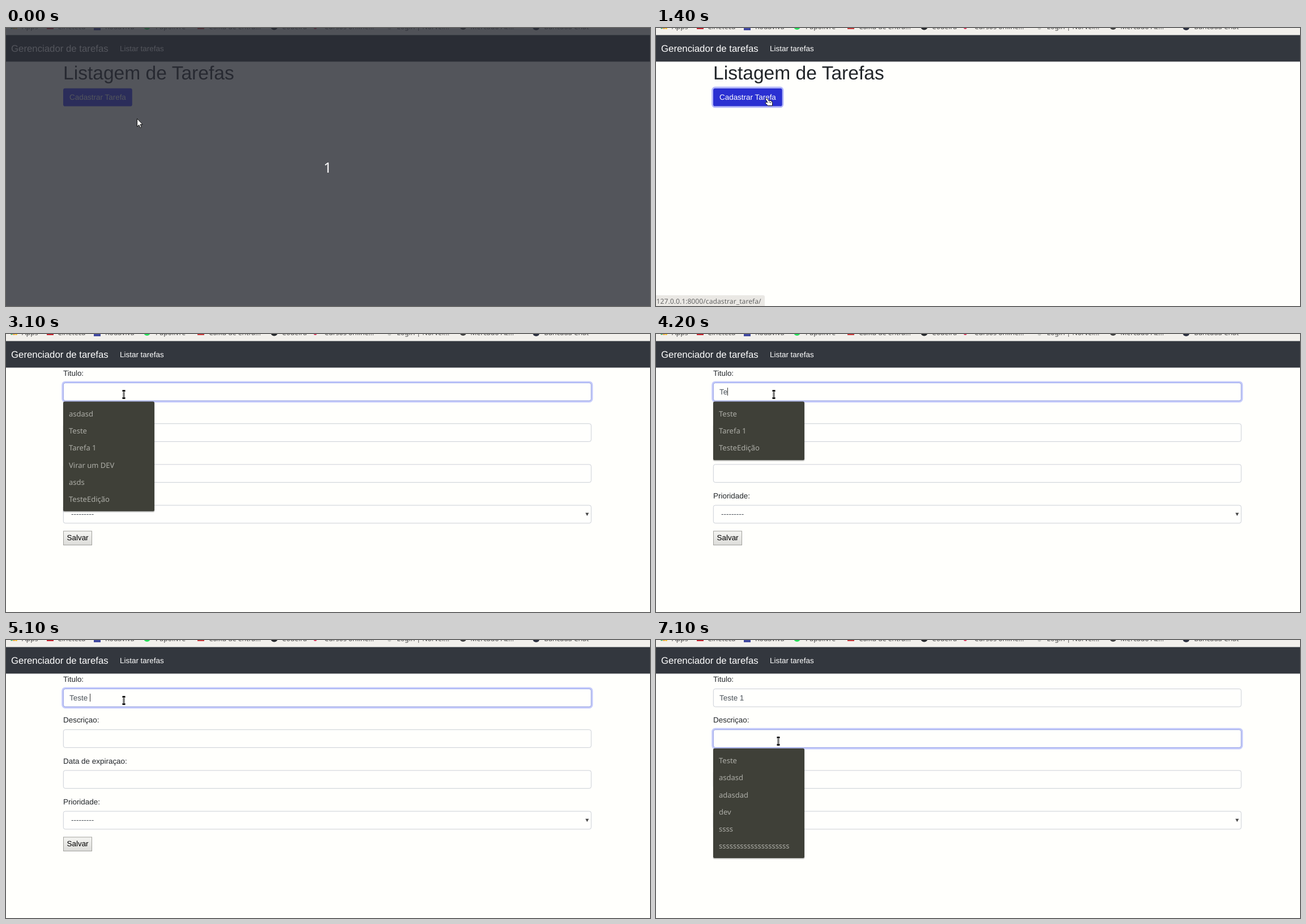
An HTML page that plays this animation: 1137x492 px, repeating every 8000 ms.

```html
<!DOCTYPE html>
<html lang="pt-BR">
<head>
<meta charset="utf-8">
<title>Gerenciador de tarefas</title>
<style>
  html, body { margin: 0; width: 100%; height: 100%; overflow: hidden; background: #fffffc; }
  svg { display: block; width: 1137px; height: 492px; }
  text { font-family: "Liberation Sans", Arial, sans-serif; text-rendering: geometricPrecision; white-space: pre; }
  .ui { font-family: "Noto Sans", "Open Sans", sans-serif; }
</style>
</head>
<body>
<svg id="stage" viewBox="0 0 1137 492"></svg>
<script>
const LOOP = 8000, STEP = 100;
const LEFT = 101, WIDTH = 932.5, FIELD_H = 31.9, PITCH = 72.2;
const INK = '#212529';

const rect = (x, y, w, h, fill, more = '') =>
  `<rect x="${x}" y="${y}" width="${w}" height="${h}" fill="${fill}" ${more}/>`;
const dot = (x, y, r, fill) => `<circle cx="${x}" cy="${y}" r="${r}" fill="${fill}"/>`;
const text = (x, y, s, size = 13.45, fill = INK, more = '') =>
  `<text x="${x}" y="${y}" font-size="${size}" fill="${fill}" ${more}>${s}</text>`;
const ui = (x, y, s, size, fill, more = '') => text(x, y, s, size, fill, 'class="ui" ' + more);
const clamp = v => Math.max(0, Math.min(1, v));
const fieldY = i => 86.4 + i * PITCH;
// Last entry whose start time has been reached
const latest = (list, t) => list.filter(e => e[0] <= t).pop();

const bookmarks = [
  [28, 'Apps'], [91, 'Cineteca'], [175, 'Rodaviva'], [264, 'Papolivre'],
  [358, 'Caixa de entra...'], [487, 'Codeira'], [562, 'Cursos online...'],
  [690, 'Login | Norvel...'], [820, 'Mercado Az...'], [950, 'Bancada Chat']
];

const typing = [
  [0, '', 112], [3500, 'T', 120], [4200, 'Te', 126], [4400, 'Tes', 133],
  [4500, 'Test', 137], [4600, 'Teste', 144], [4800, 'Teste ', 148], [5800, 'Teste 1', 156]
];

const menus = [
  [0, 0, []],
  [2500, 0, ['asdasd', 'Teste', 'Tarefa 1', 'Virar um DEV', 'asds', 'TesteEdição']],
  [3600, 0, ['Teste', 'Tarefa 1', 'TesteEdição']],
  [4500, 0, ['Teste', 'TesteEdição']],
  [4900, 0, []],
  [6700, 1, ['Teste', 'asdasd', 'adasdad', 'dev', 'ssss', 's'.repeat(20)]]
];

// Pointer path: time, x, y
const path = [
  [0, 231, 160], [600, 231, 160], [800, 222, 150], [1100, 199, 131], [1900, 199, 131],
  [2100, 208, 107], [5500, 208, 107], [5600, 214, 107], [5800, 233, 107], [5900, 233, 107],
  [6000, 238, 112], [6100, 233, 132], [6200, 222, 162], [6300, 216, 179], [LOOP, 216, 179]
];

function pointerAt(t) {
  const i = path.findIndex(p => p[0] > t);
  const [a, b] = [path[i - 1], path[i]];
  const k = (t - a[0]) / (b[0] - a[0]);
  return [a[1] + (b[1] - a[1]) * k, a[2] + (b[2] - a[2]) * k];
}

function header() {
  return rect(0, 0, 1137, 12.5, '#f2f0ec') +
    dot(10, -.5, 2, '#35a853') + dot(14, 0, 2, '#f29b30') + dot(18, 0, 2, '#f4c020') +
    rect(72, -8, 12, 10, '#c3202b') + rect(155, -8, 12, 12, '#4048a0') +
    dot(249, -3, 6, '#25e05a') + rect(338, -8, 12, 10, '#c93a3a') +
    dot(473.5, -3, 6.5, '#25282c') + dot(546, -1, 3, '#d8365c') +
    dot(677, 0, 3, '#c8c8c4') + dot(807, -3, 6, '#404040') + dot(936, -2, 6, '#2c3040') +
    bookmarks.map(([x, s]) => ui(x, 1.5, s, 12.2, '#505050')).join('') +
    rect(0, 12.5, 1137, 47, '#33373e') +
    text(9, 41.8, 'Gerenciador de tarefas', 16.8, '#fff') +
    text(201, 40.5, 'Listar tarefas', 13.45, '#fff');
}

function listPage(t) {
  const ring = t >= 1400
    ? rect(99.5, 105.2, 124.6, 34.8, 'none', 'rx="5" stroke="#b4b8fb" stroke-width="2.7"') : '';
  return text(LEFT, 91.3, 'Listagem de Tarefas', 33.6) + ring +
    rect(LEFT, 106.7, 121.8, FIELD_H, t >= 1000 ? '#2a30d2' : '#3539f5', 'rx="3.4"') +
    text(112, 127, 'Cadastrar Tarefa', 13.45, '#fff');
}

function field(i, label, focus) {
  const y = fieldY(i);
  const frame = (grow, color, w, alpha) => rect(LEFT + .3 - grow, y + .1 - grow,
    WIDTH - .6 + 2 * grow, FIELD_H - .2 + 2 * grow, 'none',
    `rx="${3.4 + grow}" stroke="${color}" stroke-width="${w}" opacity="${alpha}"`);
  return text(LEFT, y - 12.2, label) + rect(LEFT, y, WIDTH, FIELD_H, '#fffffd', 'rx="3.4"') +
    frame(1.7, '#c5cbfb', 2.7, focus) + frame(0, '#cbcfd6', 1, 1) + frame(0, '#95a2ee', 1, focus);
}

function menu([, row, items]) {
  if (!items.length) return '';
  const y = fieldY(row) + 33.2, h = 13 + 30.2 * items.length;
  return rect(100.5, y + 1, 162, h + 1, '#000', 'rx="3" opacity=".18"') +
    rect(LEFT, y, 161, h, '#3f4038', 'rx="2.5"') +
    items.map((s, i) => ui(111, y + 26.4 + i * 30.2, s, 13, '#adada7', 'font-weight="500"')).join('');
}

function formPage(t) {
  const leave = clamp((t - 6450) / 150);
  const focus = [clamp((t - 2250) / 150) - leave, leave, 0, 0];
  const labels = ['Titulo:', 'Descriçao:', 'Data de expiraçao:', 'Prioridade:'];
  const [, value, caretX] = latest(typing, t);
  const between = (a, b) => t >= a && t < b;
  let out = labels.map((s, i) => field(i, s, focus[i])).join('') +
    text(112, 107, value, 13.45, '#495057') +
    text(115, 323.4, '---------', 13.45, '#495057') +
    '<path d="M1023 316.5h6l-3 5.5z" fill="#444"/>' +
    rect(101.5, 348.9, 50, 24.6, 'url(#grey)', 'stroke="#a2a29e"') +
    text(107.5, 365.4, 'Salvar', 13.45, '#000');
  if (between(2500, 3100) || between(3500, 5300) || between(5800, 6500))
    out += rect(caretX, 95, 1, 14, '#333');
  if (between(6500, 7100)) out += rect(112, 168, 1, 14, '#333');
  return out + menu(latest(menus, t));
}

function statusBar(t) {
  const alpha = t < 1000 ? 0 : t < 1100 ? .4 : t < 1800 ? 1 : clamp((2050 - t) / 450);
  return `<g opacity="${alpha}">` + rect(-4, 473, 196, 24, '#eae8e4', 'rx="3"') +
    ui(.5, 488, '127.0.0.1:8000/cadastrar_tarefa/', 12.2, '#666') + '</g>';
}

function pointer(t) {
  const [x, y] = pointerAt(t);
  const outline = 'fill="#fff" stroke="#111" stroke-linejoin="round"';
  const beam = 'M-2.5-6.5h1.5l1 1 1-1h1.5M0-5.5v11M-2.5 6.5h1.5l1-1 1 1h1.5';
  const shape = t < 1000
    ? `<path d="M.5.5v14l3.3-3 2.2 5 2.2-1-2.2-4.8h4.2z" ${outline}/>`
    : t < 2000
      ? `<path d="M-5-6.5q2-1 3 1l2 3.2 3-.3q3.5 1 3.5 4v5h-8l-4.5-4.5q0-2 2-1.5l2 .4-3.4-5.3q-.7-1.5.4-2zM1-1v2M3.5 0v2" ${outline}/>`
      : `<path d="${beam}" fill="none" stroke="#111" stroke-width="2.8"/>` +
        '<path d="M0-5.5v11" stroke="#fff" stroke-width=".9"/>';
  return `<g transform="translate(${x} ${y})">${shape}</g>`;
}

function countdown(t) {
  return t >= 500 ? '' : rect(0, 0, 1137, 492, 'rgb(40,43,52)', 'opacity=".8"') +
    ui(568, 255.5, '1', 25, '#fff', 'text-anchor="middle"');
}

const defs = '<defs><linearGradient id="grey" x2="0" y2="1">' +
  '<stop stop-color="#f5f5f2"/><stop offset="1" stop-color="#dcdcd9"/></linearGradient></defs>';
const stage = document.getElementById('stage');
const start = performance.now();
let shown = -1;

function tick() {
  const t = Math.floor((performance.now() - start) % LOOP / STEP) * STEP;
  if (t !== shown) {
    shown = t;
    stage.innerHTML = defs + rect(0, 0, 1137, 492, '#fffffc') + header() +
      (t < 1700 ? listPage(t) : formPage(t)) + statusBar(t) + countdown(t) + pointer(t);
  }
  requestAnimationFrame(tick);
}
tick();
</script>
</body>
</html>
```
